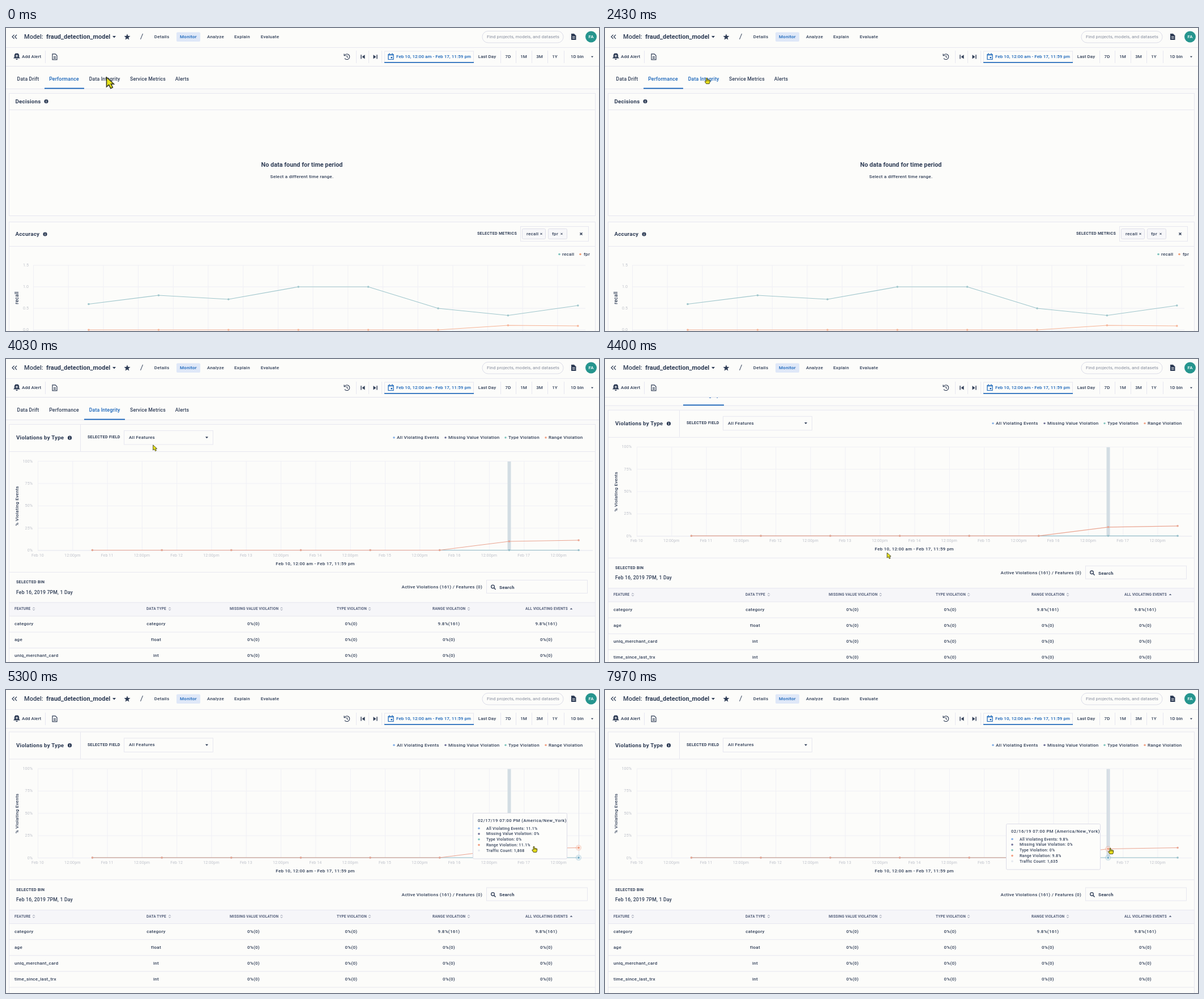
Recreate the animation shown at these times as an HTML page. Size 1047 px wide and 535 px high, loop 8 s.

```html
<!DOCTYPE html>
<html lang="en">
<head>
<meta charset="utf-8">
<title>Model monitoring</title>
<style>
html, body { margin: 0; width: 100%; height: 100%; overflow: hidden; background: #fafaf9; }
svg { display: block; }
text { font: 500 8px Roboto, sans-serif; letter-spacing: .27px; fill: #2f3d56; dominant-baseline: central; white-space: pre; }
.title { font-size: 11px; letter-spacing: 0; }
.bold { font-weight: 700; }
.notice { font-size: 10.8px; letter-spacing: .02px; }
.head { font-size: 9.8px; font-weight: 700; letter-spacing: .2px; }
.tab { font-size: 8.7px; letter-spacing: .17px; }
.bar { letter-spacing: .06px; }
.cap { font-size: 7px; font-weight: 700; letter-spacing: .32px; }
.th { font-size: 6.5px; font-weight: 700; letter-spacing: .15px; fill: #56617c; }
.axis { font-size: 7.1px; font-weight: 400; letter-spacing: .08px; fill: #bfc2cb; }
.tip { font-size: 6.9px; letter-spacing: .32px; }
.tipHead { font-size: 7.6px; letter-spacing: .5px; }
.hint { font-weight: 400; letter-spacing: .06px; fill: #858c9c; }
.blue { fill: #1562b8; }
</style>
</head>
<body>
<svg id="stage" width="1047" height="535" viewBox="0 0 1047 535"></svg>
<script>
const INK = '#2f3d56', BLUE = '#1562b8', EDGE = '#e7e7f0', GRID = '#f0f0f5', PANEL = '#fcfcfa';
const COLORS = ['#82aee6', '#6d6f96', '#7fc3bd', '#f2a083', '#e6e9ef'];
const KINDS = ['All Violating Events', 'Missing Value Violation', 'Type Violation', 'Range Violation'];

const text = (x, y, s, cls = '', anchor = 'start', extra = '') =>
  `<text x="${x}" y="${y}" class="${cls}" text-anchor="${anchor}" ${extra}>${s}</text>`;
const mid = (x, y, s, cls) => text(x, y, s, cls, 'middle');
const upright = (x, y, s, cls) => text(0, 0, s, cls, 'middle', `transform="translate(${x} ${y}) rotate(-90)"`);
const rect = (x, y, w, h, fill = 'none', stroke = 'none', r = 0) =>
  `<rect x="${x}" y="${y}" width="${w}" height="${h}" rx="${r}" fill="${fill}" stroke="${stroke}"/>`;
const path = (d, stroke = 'none', fill = 'none', width = 1) =>
  `<path d="${d}" stroke="${stroke}" fill="${fill}" stroke-width="${width}"/>`;
const hline = (x, y, w, color = EDGE) => rect(x, y, w, 1, color);
const vline = (x, y, h, color = EDGE) => rect(x, y, 1, h, color);
const dot = (x, y, r, fill, extra = '') => `<circle cx="${x}" cy="${y}" r="${r}" fill="${fill}" ${extra}/>`;
const group = (id, body) => `<g id="${id}">${body}</g>`;
const caret = (x, y, s = 2.5) => path(`M${x - s} ${y - s / 2}h${2 * s}l${-s} ${s * 1.2}z`, 'none', INK);
const cross = (x, y, s = 1.6, w = 1) => path(`M${x - s} ${y - s}l${2 * s} ${2 * s}m0 ${-2 * s}l${-2 * s} ${2 * s}`, INK, 'none', w);
const info = (x, y) => dot(x, y, 3.6, INK) + path(`M${x} ${y - .5}v2.6m0 -4.4v1`, '#fff');
const page = (x, y) => path(`M${x - 4} ${y - 5}h5l3 3v7h-8zM${x - 2} ${y}h4m-4 2.5h4`, INK, 'none', 1.2);
const series = (xs, ys, color) =>
  path('M' + xs.map((x, i) => `${x} ${ys[i]}`).join('L'), color, 'none', 1.2) +
  xs.map((x, i) => dot(x, ys[i], 1.8, color)).join('');
const range = (n, f) => Array.from({ length: n }, (_, i) => f(i)).join('');
const points = (x0, step) => Array.from({ length: 8 }, (_, i) => x0 + step * i);

function topBar() {
  const star = range(10, i => {
    const a = i * Math.PI / 5, r = i % 2 ? 2.5 : 5.8;
    return `${i ? 'L' : 'M'}${214 + r * Math.sin(a)} ${16 - r * Math.cos(a)}`;
  }) + 'z';
  return rect(0, 0, 1047, 68, PANEL) + hline(0, 34, 1047) + hline(0, 67, 1047, '#e2e2ec') +
    path('M14.5 12l-3.5 3.5 3.5 3.5m4.5 -7l-3.5 3.5 3.5 3.5', INK, 'none', 1.2) +
    text(32, 15.5, 'Model:', 'title') + text(71, 15.5, 'fraud_detection_model', 'title bold') +
    caret(191, 15.5, 3) + path(star, 'none', INK) + path('M237.5 20l4 -10', INK) +
    rect(301, 7.5, 42, 16.5, '#dfe8f8', 'none', 2) +
    [[275, 'Details'], [322, 'Monitor', 'blue'], [370, 'Analyze'], [417, 'Explain'], [466, 'Evaluate']]
      .map(([x, s, c]) => mid(x, 15.5, s, c)).join('') +
    rect(841, 5.5, 143, 20.5, PANEL, '#dcdde8', 10) + text(849, 15.5, 'Find projects, models, and datasets', 'hint') +
    path('M998 10h5l3.5 3.5v7.5h-8.5z', 'none', INK) + path('M1000 15.5h4.5m-4.5 2.5h4.5', '#fff') +
    dot(1033, 15.5, 10, '#26958e') + text(1033, 15.5, 'FA', 'bar', 'middle', 'style="fill:#fff"');
}

function toolBar() {
  return path('M13 53.5h12l-1.8 -2.2v-2.8a4.2 4.2 0 0 0 -8.4 0v2.8zM17.2 54.5h3.6a1.8 1.8 0 0 1 -3.6 0zM18.2 45v-.8h1.6v.8z', 'none', INK) +
    path('M19 47v4.5m-2.25 -2.25h4.5', '#fff') + text(28, 50.5, 'Add Alert', 'bar') + page(86, 50.8) +
    path('M598 48a4.8 4.8 0 1 1 0 5.6M597 45.5v3.2h3.2M602 48v3l2 1', INK, 'none', 1.1) +
    path('M627 47.2v7.4', INK, 'none', 1.4) + path('M633.5 47.2v7.4l-5 -3.7z', 'none', INK) +
    path('M655 47.2v7.4', INK, 'none', 1.4) + path('M648.5 47.2v7.4l5 -3.7z', 'none', INK) +
    [69, 618, 640, 663, 873, 900, 928, 956, 985].map(x => vline(x, 40, 22)).join('') +
    rect(668.5, 41, 157, 20, PANEL, EDGE) + rect(668, 60, 158, 1.6, BLUE) +
    path('M675 46.5h9v9h-9zM675 48h9M677 46.500v-2m5 2v-2', BLUE, 'none', 1.2) + rect(679.5, 51, 2.5, 2.5, BLUE) +
    text(689, 50.5, 'Feb 10, 12:00 am - Feb 17, 11:59 pm', 'bar blue') +
    [[849.5, 'Last Day'], [886.5, '7D'], [914, '1M'], [942, '3M'], [969, '1Y'], [1008.5, '1D bin']]
      .map(([x, s]) => mid(x, 50.5, s, 'bar')).join('') + caret(1035, 50.8, 2);
}

function tabs() {
  const names = [[39, 'Data Drift'], [102.5, 'Performance'], [174, 'Data Integrity'], [250.5, 'Service Metrics'], [311, 'Alerts']];
  return rect(0, 68, 1047, 40, PANEL) + hline(0, 107, 1047) +
    names.map(([x, s], i) => text(x, 89.5, s, 'tab', 'middle', `id="tab${i}"`)).join('') +
    `<rect id="underline" y="105.700" height="1.800" fill="${BLUE}"/>`;
}

function performanceView() {
  const xs = points(146, 123.4), grid = range(16, i => vline(48 + 61.7 * i, 419, 116, GRID));
  return rect(5.5, 115.5, 1035, 216, PANEL, EDGE) + hline(6, 144, 1034) +
    text(16.5, 129.5, 'Decisions', 'head') + info(71, 129.5) +
    mid(522.5, 241.6, 'No data found for time period', 'notice bold') + mid(522.5, 262, 'Select a different time range.') +
    rect(5.5, 342.5, 1035, 230, PANEL, EDGE) + hline(6, 385, 1034) +
    text(16.5, 363.5, 'Accuracy', 'head') + info(69, 364) + text(832, 363, 'SELECTED METRICS', 'cap') +
    rect(908.5, 350.5, 120, 26, PANEL, EDGE) +
    rect(911.5, 354.5, 41, 18, '#f7f7f9', '#dfdfe9', 2) + rect(957.5, 354.5, 33, 18, '#f7f7f9', '#dfdfe9', 2) +
    text(919, 363.5, 'recall') + cross(945, 363.5) + text(964, 363.5, 'fpr') + cross(981, 363.5) + cross(1015.5, 363.5, 2, 1.4) +
    dot(977, 399.5, 1.8, COLORS[2]) + text(982, 399.5, 'recall') + dot(1014, 399.5, 1.8, '#f0a07a') + text(1020, 399.5, 'fpr') +
    grid + range(4, i => hline(48, 418.5 + 38 * i, 975, GRID) + text(40, 418.5 + 38 * i, (1.5 - i / 2).toFixed(1), 'axis', 'end')) +
    upright(19, 476.5, 'recall', 'tab') +
    series(xs, [487.5, 472, 479, 457, 457, 495, 507.5, 490], '#9fc6cc') +
    series(xs, [533, 533, 533, 533, 533, 533, 525, 526], '#f6b497');
}

function timeAxis(x0, step, center) {
  return range(16, i => vline(x0 + i * step, 181, 157, GRID) +
      mid(x0 + i * step, 346, i % 2 ? '12:00pm' : `Feb ${10 + i / 2}`, 'axis')) +
    hline(x0, 337.5, 1036 - x0, '#e2e3ec') + mid(center, 361, 'Feb 10, 12:00 am - Feb 17, 11:59 pm');
}

function rows(list, suffix) {
  return list.map(([name, type, rate = '0%' + suffix], i) => {
    const y = 467.7 + 28.1 * i;
    return text(15, y, name) + mid(265, y, type) +
      [437, 609.5].map(x => mid(x, y, '0%' + suffix)).join('') +
      [782, 954].map(x => mid(x, y, rate)).join('') + hline(6, y + 14, 1034);
  }).join('');
}

function integrityView() {
  const features = [['age', 'float'], ['uniq_merchant_card', 'int'], ['time_since_last_trx', 'int']];
  const xs = points(152.5, 122.65), zero = Array(8).fill(337.5);
  const violating = [...zero.slice(0, 6), 322, 320];
  const sorter = x => path(`M${x - 1.7} 440.4l1.7 -1.7 1.7 1.7m-3.4 1.6l1.7 1.7 1.7 -1.7`, '#6b748c', 'none', .8);
  const loading = timeAxis(29, 63, 533) + rect(882, 181, 6, 157, '#d3dde3') +
    text(841, 402.5, 'Active Violations (0) / Features (0)', '', 'end') + rows(features, '(-)') +
    dot(523, 246, 17.5, 'none', 'stroke="#dfdfe4" stroke-width="2"') +
    group('spinner', path('M-16.2 -7A17.6 17.6 0 0 1 6.5 -16.3', '#6c6f76', 'none', 2));
  const loaded = timeAxis(56, 61.3, 546) +
    range(5, i => hline(56, 180 + 39.4 * i, 980, GRID) + text(47, 180 + 39.4 * i, 100 - 25 * i + '%', 'axis', 'end')) +
    rect(885.5, 181, 6, 157, '#d3dde3') +
    series(xs, zero, '#96bfc9') + series(xs, violating, '#eaa592') +
    text(841, 402.5, 'Active Violations (161) / Features (0)', '', 'end') +
    rows([['category', 'category', '9.8%(161)'], ...features], '(0)');
  return rect(5.5, 115.5, 1035, 500, PANEL, EDGE) + hline(6, 163, 1034) + vline(131, 116, 47) +
    text(18, 138.7, 'Violations by Type', 'head') + info(112.5, 139.2) + text(144, 138.3, 'SELECTED FIELD', 'cap') +
    rect(208.5, 126.5, 157, 24.5, PANEL, EDGE) + text(217, 138.3, 'All Features') + caret(354.5, 138.5) +
    [685, 776, 882, 953].map((x, i) => dot(x, 138.8, 1.7, COLORS[i]) + text(x + 5, 138.6, KINDS[i])).join('') +
    upright(19, 259.5, '% Violating Events') + hline(6, 376, 1034) +
    text(18, 394, 'SELECTED BIN', 'cap') + text(18, 411.5, 'Feb 16, 2019 7PM, 1 Day', 'tab') +
    rect(848.5, 390.5, 178, 23, PANEL, EDGE) + dot(859.5, 402, 2.8, 'none', `stroke="${INK}" stroke-width="1.3"`) +
    path('M861.5 404l3 3', INK, 'none', 1.5) + text(871, 403.3, 'Search', 'bold') +
    rect(6, 429.5, 1034, 24.5, '#f6f6f9') + hline(6, 429.5, 1034) + hline(6, 453.5, 1034) +
    [[15, 'FEATURE', 49], [248, 'DATA TYPE', 289], [395, 'MISSING VALUE VIOLATION', 486.5], [584, 'TYPE VIOLATION', 642], [753, 'RANGE VIOLATION', 817]]
      .map(([x, s, icon]) => text(x, 441.2, s, 'th') + sorter(icon)).join('') +
    text(917, 441.2, 'ALL VIOLATING EVENTS', 'th') + path('M995.7 442.3l2.3 -2.7 2.3 2.7z', 'none', '#56617c') +
    group('loading', loading) + group('loaded', loaded);
}

// Halos plus tooltip for one hovered day
const hover = (i, x, y, day, rate, traffic) => group('hover' + i,
  vline(x, 181, 157, '#e0e2ea') +
  [[y, COLORS[3]], [337.5, '#7fb4cc']].map(([cy, c]) =>
    dot(x, cy, 5.2, c, 'opacity=".3"') + dot(x, cy, 2.6, c, 'stroke="#fff"')).join('') +
  group('tip' + i, rect(.5, .5, 166, 80.5, '#fdfdfb', '#dcdce8', 2) +
    text(9, 13.5, `02/${day}/19 07:00 PM (America/New_York)`, 'tipHead') +
    [...KINDS, 'Traffic Count'].map((kind, k) =>
      dot(11, 27.2 + 9.8 * k, 1.8, COLORS[k]) +
      text(24, 27.5 + 9.8 * k, `${kind}: ${k == 4 ? traffic : k % 3 ? '0%' : rate}`, 'tip')).join('')));

const stage = document.getElementById('stage');
stage.innerHTML = rect(0, 0, 1047, 535, '#fafaf9') +
  group('content', tabs() + group('performance', performanceView()) + group('integrity', integrityView()) +
    hover(0, 1011, 320, 17, '11.1%', '1,868') + hover(1, 888.3, 322, 16, '9.8%', '1,635')) +
  topBar() + toolBar() +
  group('arrow', path('M0 0V9.6L2.4 7.6 4.2 11.2 6.2 10.2 4.5 6.8H7.4Z', '#3c3d22', '#e9e51c', .9)) +
  group('hand', path('M-.9 .6Q0 -.4 .9 .6V3.5Q3 3 5.7 4.4V7.4L4.6 10.4H-.8L-3.3 6.6Q-3 5.2 -.9 6.4Z', '#4a4a20', '#e9e01c', 1) +
    path('M1 4v2m1.8 -1.5v1.8m1.6 -1.5v1.5', '#4a4a20', 'none', .7));

const $ = id => document.getElementById(id);
const show = (id, on) => $(id).style.display = on ? '' : 'none';
const move = (id, x, y, more = '') => $(id).setAttribute('transform', `translate(${x} ${y}) ${more}`);
const ease = (t, a, b) => { const p = Math.min(1, Math.max(0, (t - a) / (b - a))); return p * p * (3 - 2 * p); };

// Pointer stops: time, x, y
const STOPS = [[0, 177.5, 87], [830, 179.5, 88], [3900, 179.5, 88], [4300, 498, 342], [4700, 498, 342],
  [5050, 1006, 281], [5300, 932, 276], [5700, 892, 279], [8000, 892, 279]];
function pointer(t) {
  const i = STOPS.findIndex(s => s[0] > t), [t0, x0, y0] = STOPS[i - 1], [t1, x1, y1] = STOPS[i];
  const p = ease(t, t0, t1);
  return [x0 + (x1 - x0) * p, y0 + (y1 - y0) * p];
}

function draw(t) {
  const integrity = t >= 2500, ready = t >= 3300, hovered = t < 4980 ? -1 : t < 5400 ? 0 : 1;
  const isHand = t >= 500 && t < 3940 || hovered >= 0;
  show('performance', !integrity);
  show('integrity', integrity);
  show('loading', !ready);
  show('loaded', ready);
  $('underline').setAttribute('x', integrity ? 138 : 68);
  $('underline').setAttribute('width', integrity ? 72 : 70);
  $('tab1').classList.toggle('blue', !integrity);
  $('tab2').classList.toggle('blue', integrity || isHand);
  move('spinner', 523, 246, `rotate(${(t - 3130) * .36})`);
  move('content', 0, -41.5 * ease(t, 4195, 4555));

  show('hover0', hovered == 0);
  show('hover1', hovered == 1);
  const slide = ease(t, 5400, 5650);
  move('tip0', 824, 258.5);
  move('tip1', 824 - 116 * slide, 258.5 + 19 * slide);

  const [x, y] = pointer(t);
  show('arrow', !isHand);
  show('hand', isHand);
  move('arrow', x, y, `scale(${1.75 - .8 * ease(t, 50, 450)})`);
  move('hand', x, y);
}

(function tick() {
  draw(performance.now() % 8000);
  requestAnimationFrame(tick);
})();
</script>
</body>
</html>
```
